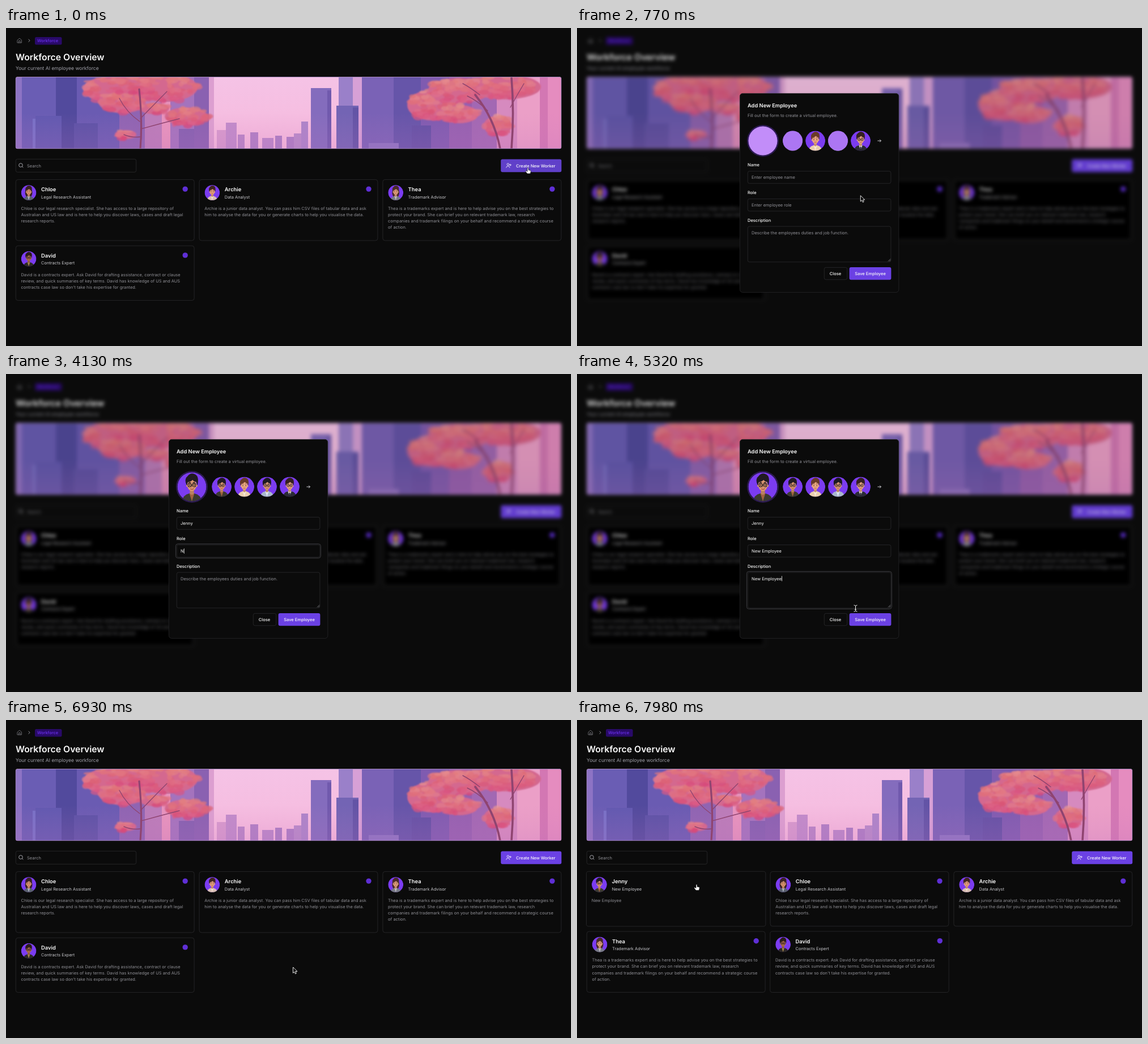
Write an HTML page that moves like this. It is 997 by 561 pixels and loops after 8 s.

```html
<!DOCTYPE html>
<html lang="en">
<head>
<meta charset="utf-8">
<title>Workforce Overview</title>
<style>
html, body { margin: 0; width: 100%; height: 100%; overflow: hidden; background: #0b0b0b; }
#veil, svg { position: absolute; left: 0; top: 0; width: 997px; height: 561px; }
#veil { background: #0b0b0b; overflow: hidden; }
#veil svg { filter: blur(3.4px) brightness(.9); }
text { font-family: Inter, "Open Sans", sans-serif; white-space: pre; text-rendering: geometricPrecision; }
</style>
</head>
<body>
<svg id="page"></svg>
<div id="veil"><svg id="soft"></svg></div>
<svg id="front"></svg>
<script>
const $ = id => document.getElementById(id);
const WHITE = '#fafafa', GREY = '#8f8f95', LINE = '#27272a', PURPLE = '#6b41e4', HOVER = '#6040c9';

// ---------- drawing helpers ----------
const text = (x, y, s, size = 7.5, fill = WHITE, weight = 400, extra = '') =>
  `<text x="${x}" y="${y}" font-size="${size}" fill="${fill}" font-weight="${weight}" ${extra}>${s}</text>`;
const rect = (x, y, w, h, fill, r = 0, extra = '') =>
  `<rect x="${x}" y="${y}" width="${w}" height="${h}" rx="${r}" fill="${fill}" ${extra}/>`;
const frame = (x, y, w, h, r, extra = '') => rect(x, y, w, h, 'none', r, `stroke="${LINE}" stroke-width=".9" ${extra}`);
const circle = (x, y, r, fill, extra = '') => `<circle cx="${x}" cy="${y}" r="${r}" fill="${fill}" ${extra}/>`;
const ellipse = (x, y, rx, ry, fill, extra = '') =>
  `<ellipse cx="${x}" cy="${y}" rx="${rx}" ry="${ry}" fill="${fill}" ${extra}/>`;
const path = (d, fill, extra = '') => `<path d="${d}" fill="${fill}" ${extra}/>`;
const line = (d, color, width, extra = '') =>
  path(d, 'none', `stroke="${color}" stroke-width="${width}" stroke-linecap="round" stroke-linejoin="round" ${extra}`);

// ---------- avatars ----------
const looks = {
  quiff:  { hair: '#211b22', coat: '#3b3a30', shirt: '#a0623f', skin: '#dc9872', glasses: 1 },
  wavy:   { hair: '#6a3b28', coat: '#e9cfae', shirt: '#f7e8d4', skin: '#eba982' },
  clerk:  { hair: '#1d1a22', coat: '#a9b7cd', shirt: '#dfe7f1', skin: '#dd9b76', glasses: 1 },
  bob:    { hair: '#35211f', coat: '#2a2a35', shirt: '#e4e4ea', skin: '#e9a883', glasses: 1, tie: 1 },
  long:   { hair: '#3a2224', coat: '#59606e', shirt: '#aeb2bf', skin: '#d8946f', long: 1 },
  curly:  { hair: '#40241f', coat: '#d8bfb4', shirt: '#f0dccd', skin: '#e6a17c' },
  auburn: { hair: '#4a2b28', coat: '#777a86', shirt: '#c2bcc2', skin: '#dd9e7c', long: 1 },
  suit:   { hair: '#2a1c18', coat: '#2c2926', shirt: '#a88a4e', skin: '#a96c48', glasses: 1 }
};
function avatar(name, x, y, r) {
  const k = looks[name];
  const glasses = [-7.5, 7.5].map(e => circle(e, -6, 6, 'none', 'stroke="#1c161b" stroke-width="2.2"')).join('');
  return `<g transform="translate(${x} ${y}) scale(${r / 50})" clip-path="url(#disc)">` +
    circle(0, 0, 50, '#7b3cf0') +
    (k.long ? ellipse(0, 0, 24, 33, k.hair) : '') +
    path('M-34 52Q-32 28 -9 23H9Q32 28 34 52Z', k.coat) +
    path('M-9 22L0 50L9 22Z', k.shirt) +
    (k.tie ? path('M-3 30H3L4 52H-4Z', '#23232e') : '') +
    path('M-7 8H7V23Q0 32 -7 23Z', k.skin, 'filter="brightness(.85)"') +
    circle(-16, -4, 4, k.skin) + circle(16, -4, 4, k.skin) +
    ellipse(0, -6, 16, 20.5, k.skin) +
    path('M-18 -4Q-28 -28 -15 -37Q-4 -50 9 -44Q27 -38 19 -4L15 -17Q6 -17 3 -24Q-6 -16 -14 -16Z', k.hair) +
    circle(-7.5, -6, 2.2, '#231815') + circle(7.5, -6, 2.2, '#231815') +
    line('M-11 -14Q-8 -16 -4 -14M4 -14Q8 -16 11 -14', k.hair, 2.2) +
    (k.glasses ? glasses + line('M-2 -6H2', '#1c161b', 2) : '') +
    line('M-1 -1Q1 3 -1 3', '#b8704f', 1.6) + line('M-5 7Q1 11 6 6', '#9a4438', 2) + '</g>';
}

// ---------- banner ----------
function banner() {
  let seed = 11;
  const rnd = () => (seed = seed * 16807 % 2147483647) / 2147483647;
  const towers = [
    [17, 87, 28, '#8d73c4'], [28, 87, 62, '#6a5db4'], [88, 87, 37, '#524a9d'], [47, 160, 38, '#7770c6'],
    [52, 155, 46, '#6259b0'], [125, 87, 75, '#6a5bb2'], [120, 168, 42, '#5c52a6'], [200, 87, 45, '#8f64b2'],
    [245, 87, 45, '#bb7cb9'], [275, 130, 30, '#e793bd'], [290, 87, 42, '#a473bd'], [332, 87, 26, '#8a61b1'],
    [358, 87, 9, '#dc9fd0'], [305, 178, 27, '#8560b0'],
    [372, 180, 16, '#d79acd'], [388, 167, 19, '#c18bca'], [409, 188, 12, '#b985c6'], [431, 184, 14, '#b07fc4'],
    [452, 194, 20, '#bb87c8'], [475, 190, 12, '#ac7dc3'], [495, 192, 14, '#ad7dc4'], [508, 186, 13, '#b88ac9'],
    [521, 165, 12, '#ad84c9'], [587, 87, 26, '#9a80c9'], [612, 87, 16, '#d7a0d6'], [538, 106, 36, '#846cbd'],
    [567, 110, 7, '#7059ad'], [583, 137, 39, '#7364b4'], [612, 140, 10, '#6354a6'],
    [628, 87, 62, '#7a62b6'], [684, 87, 48, '#6655a9'], [732, 87, 50, '#7f5bb0'], [782, 87, 40, '#9560b0'],
    [822, 87, 44, '#a268b3'], [866, 87, 36, '#d68abf'], [902, 87, 40, '#eb9fc7'], [942, 87, 14, '#d377b3'],
    [956, 87, 24, '#e58cbf'], [640, 203, 53, '#8d74c2'], [716, 172, 34, '#6451a5']
  ];
  // a soft body with dabs of colour, lit from above
  const leaves = (x, y, w, h) => {
    let out = ellipse(x, y, w, h, '#d4688f');
    for (let n = w * h / 18; n > 0; n--) {
      const a = rnd() * 6.28, d = Math.sqrt(rnd()), v = Math.sin(a) * d;
      const light = 62 - 7 * v + rnd() * 6;
      out += ellipse((x + Math.cos(a) * w * d).toFixed(1), (y + v * h).toFixed(1), (4 + rnd() * 7).toFixed(1),
        (2 + rnd() * 4).toFixed(1), `hsl(${(350 - 12 * v).toFixed(0)} 64% ${light.toFixed(0)}%)`, 'opacity=".7"');
    }
    return out;
  };
  const crown = list => `<g filter="url(#mist)">${list.map(c => leaves(...c)).join('')}</g>`;
  const bark = '#8f4470';
  return `<g clip-path="url(#strip)">` + rect(17, 86, 963, 127, 'url(#sky)') +
    towers.map(([x, y, w, c]) => rect(x, y, w, 213 - y, c)).join('') +
    rect(17, 150, 963, 63, 'url(#haze)') +
    crown([[180, 108, 44, 22], [205, 130, 42, 20], [280, 105, 58, 25], [225, 98, 60, 18], [318, 156, 38, 16], [262, 142, 26, 10], [211, 188, 19, 8]]) +
    line('M236 165Q212 148 200 124M237 160Q262 134 284 112M237 192Q222 194 208 188M238 178Q275 168 306 160', bark, 1.4) +
    line('M237 213Q241 165 235 108', bark, 3.2) +
    crown([[752, 136, 44, 27], [800, 110, 55, 22], [880, 104, 64, 22], [800, 152, 34, 16], [868, 172, 25, 17]]) +
    line('M836 118Q818 104 806 98M850 146Q832 128 814 120M890 140Q902 118 914 98', bark, 1.4) +
    line('M892 213Q897 150 892 88M872 213Q862 160 828 118', bark, 3.6) +
    '</g>' + frame(17.3, 86.5, 962.4, 126.2, 3, 'style="stroke:#a184bd"');
}

// ---------- worker cards ----------
const workers = {
  Jenny: ['New Employee', 'quiff', ['New Employee']],
  Chloe: ['Legal Research Assistant', 'long', ['Chloe is our legal research specialist. She has access to a large repository of',
    'Australian and US law and is here to help you discover laws, cases and draft legal', 'research reports.']],
  Archie: ['Data Analyst', 'curly', ['Archie is a junior data analyst. You can pass him CSV files of tabular data and ask',
    'him to analyse the data for you or generate charts to help you visualise the data.']],
  Thea: ['Trademark Advisor', 'auburn', ['Thea is a trademarks expert and is here to help advise you on the best strategies to',
    'protect your brand. She can brief you on relevant trademark law, research',
    'companies and trademark filings on your behalf and recommend a strategic course', 'of action.']],
  David: ['Contracts Expert', 'suit', ['David is a contracts expert. Ask David for drafting assistance, contract or clause',
    "review, and quick summaries of key terms. David has knowledge of US and AUS", "contracts case law so don't take his expertise for granted."]]
};
function card(name, i, rowY, rowH, dark) {
  const [role, look, lines] = workers[name];
  const x = 17.3 + i % 3 * 323.8, y = rowY[i / 3 | 0], h = rowH[i / 3 | 0];
  return `<g data-worker="${name}" data-mid="${x + 157.4} ${y + h / 2}">` +
    frame(x, y, 314.8, h, 4) + (dark ? rect(x + 4, y + 4, 306, h - 8, '#000') : '') +
    avatar(look, x + 22.8, y + 23, 13.4) +
    text(x + 44.7, y + 20.9, name, 9.4, WHITE, 600) + text(x + 44.7, y + 33.2, role, 7.45, '#c6c6ca') +
    (name === 'Jenny' ? '' : circle(x + 298.9, y + 16.7, 4.7, '#5f2fd6')) +
    lines.map((s, n) => text(x + 9.2, y + 53.3 + n * 11.15, s, 7.43, GREY)).join('') + '</g>';
}
const cards = (names, rowY, rowH, dark) => names.map((n, i) => card(n, i, rowY, rowH, dark)).join('');

function scene(dark) {
  const before = cards(['Chloe', 'Archie', 'Thea', 'David'], [267.4, 384.2], [107.6, 96.4], dark);
  const after = dark ? '' : cards(['Jenny', 'Chloe', 'Archie', 'Thea', 'David'], [267.4, 373], [96.4, 107.4]);
  return `<defs><clipPath id="disc"><circle r="50"/></clipPath>
    <clipPath id="strip"><rect x="17" y="86.2" width="963" height="126.8" rx="3.5"/></clipPath>
    <filter id="mist"><feGaussianBlur stdDeviation="1.3"/></filter>
    <linearGradient id="sky" x2="0" y2="1"><stop stop-color="#f5c3e6"/><stop offset="1" stop-color="#f6b9dc"/></linearGradient>
    <linearGradient id="haze" x2="0" y2="1"><stop stop-color="#d07fc0" stop-opacity="0"/><stop offset="1" stop-color="#c070c0" stop-opacity=".2"/></linearGradient></defs>` +
    line('M20.3 21.2L23.9 18.2L27.5 21.2V26H20.3ZM22.6 26V22.6H25.2V26', '#8d8d94', .7) +
    line('M39.9 20L42 22.2L39.9 24.4', '#a1a1aa', .9) +
    rect(51, 16, 47.5, 13.6, '#290a69', 2.5) + text(55, 25.1, 'Workforce', 7.4, '#6a30ee', 500) +
    text(17, 57.3, 'Workforce Overview', 15.75, WHITE, 600) +
    text(17, 74.1, 'Your current AI employee workforce', 8.6, '#a1a1aa') +
    banner() +
    frame(17.3, 231.3, 212.4, 23, 3) + line('M28.6 244.4L30 246', '#b4b4ba', .9) +
    circle(26, 242, 3.3, 'none', 'stroke="#b4b4ba" stroke-width=".9"') +
    text(37, 245.5, 'Search', 7.5, '#8d8d93') +
    rect(873.2, 231.4, 107, 22.8, PURPLE, 3, 'class="create"') +
    circle(885.8, 240.6, 1.8, 'none', 'stroke="#fff" stroke-width=".8"') +
    line('M882.6 246.2Q882.8 243.7 885.8 243.7Q888.6 243.7 888.9 246.2M889.9 240V243.2M888.3 241.6H891.5', '#fff', .8) +
    text(900, 245.5, 'Create New Worker', 7.45, WHITE, 500) +
    `<g class="before">${before}</g><g class="after">${after}</g>`;
}

// ---------- dialog ----------
const fields = [
  { id: 'name', label: 'Name', y: 252.6, h: 21.6, hint: 'Enter employee name' },
  { id: 'role', label: 'Role', y: 301.4, h: 21.6, hint: 'Enter employee role' },
  { id: 'desc', label: 'Description', y: 350, h: 62.8, hint: 'Describe the employees duties and job function.' }
];
const faces = [['quiff', 328, 25.5], ['quiff', 380.6, 17.5], ['wavy', 420.6, 17.5], ['clerk', 460.5, 17.5], ['bob', 500.5, 17.5]];
const dialog = () =>
  rect(287.4, 115.4, 280.4, 351, '#0b0b0b', 5, `stroke="${LINE}" stroke-width=".8"`) +
  text(301, 140.2, 'Add New Employee', 9.3, WHITE, 600) +
  text(301, 156.5, 'Fill out the form to create a virtual employee.', 7.55, GREY) +
  circle(328, 199, 28, '#2c1a52') +
  faces.map(([look, x, r], i) => avatar(look, x, 199, r) +
    (i === 2 || i === 4 ? '' : circle(x, 199, r, i ? '#ac76f3' : '#c28df9', 'class="blank"'))).join('') +
  line('M530.8 199H536.4M534.4 197L536.4 199L534.4 201', '#dedee2', .9) +
  fields.map(f => text(301, f.y - 8.4, f.label, 7.5, WHITE, 500) +
    frame(299.4, f.y - 1.7, 256, f.h + 3.4, 4, `id="${f.id}Ring" style="stroke:#424247"`) +
    frame(301.3, f.y, 252.6, f.h, 3) + text(308, f.y + 13.5, '', 7.5, WHITE, 400, `id="${f.id}"`)).join('') +
  line('M549.3 411.3L553 407.6M551.6 411.3L553 409.9', '#a0a0a5', .7) +
  rect(308, 0, .8, 9, WHITE, 0, 'id="caret"') +
  frame(436.3, 422.4, 40.4, 21.4, 3) + text(456, 435.8, 'Close', 7.5, WHITE, 500, 'text-anchor="middle"') +
  rect(480.6, 422, 73.8, 22.2, PURPLE, 3, 'id="save"') +
  text(517.5, 435.8, 'Save Employee', 7.5, WHITE, 500, 'text-anchor="middle"');

const beam = 'M-2.6 -5.6Q0 -5.6 0 -4V4Q0 5.6 -2.6 5.6M2.6 -5.6Q0 -5.6 0 -4M2.6 5.6Q0 5.6 0 4M-1.4 1.6H1.4';
const pointers = {
  arrow: path('M0 0V10.4L2.4 8.2L4 11.8L5.8 11L4.2 7.5H7.4Z', '#000', 'stroke="#fff" stroke-width=".9" stroke-linejoin="round"'),
  hand: path('M-1 1A1 1 0 0 1 1 1V4.1L4.4 4.8Q5.4 5.1 5.2 6.2L4.6 9.2Q4.3 10.4 3.2 10.4H-.6Q-1.4 10.4 -2 9.6L-4.1 6.5Q-4.4 5.4 -3.5 5.2T-2 5.9L-1 6.8Z',
    '#fff', 'stroke="#000" stroke-width=".6"'),
  text: line(beam, '#000', 2) + line(beam, '#fff', 1)
};

$('page').innerHTML = scene(false);
$('soft').innerHTML = scene(true);
$('front').innerHTML = `<g id="dialog">${dialog()}</g><g id="pointer"></g>`;
show(document.querySelector('#soft .after'), false);

// ---------- timeline ----------
function show(el, on) { el.style.display = on ? '' : 'none'; }
const ramp = (t, a, b) => Math.min(1, Math.max(0, (t - a) / (b - a)));
const smooth = p => p * p * (3 - 2 * p);

// time, x, y, shape from that time on
const moves = [
  [0, 921, 246.5, 'hand'], [280, 921, 246.5, 'arrow'], [770, 500.3, 295.6, 'arrow'], [840, 497, 281, 'arrow'],
  [1120, 404.5, 267.5, 'text'], [4900, 404.5, 267.5, 'text'], [5250, 491.5, 413.5, 'text'], [5390, 491.5, 413.5, 'text'],
  [5600, 506.5, 436.8, 'hand'], [6020, 506.5, 436, 'arrow'], [7000, 506.5, 436, 'hand'], [7250, 506.5, 436, 'hand'],
  [7980, 211, 290, 'hand']
];
function pointerAt(t) {
  let i = moves.length - 1;
  while (moves[i][0] > t) i--;
  const a = moves[i], b = moves[i + 1] || a;
  const p = a === b ? 0 : smooth(ramp(t, a[0], b[0]));
  return [a[1] + (b[1] - a[1]) * p, a[2] + (b[2] - a[2]) * p, a[3]];
}

const nameKeys = [2660, 2870, 2940, 3080, 3150];
const title = 'New Employee';
function typed(t) {
  const role = t < 4480 ? (t < 4130 ? 0 : Math.min(4, 1 + Math.floor((t - 4130) / 70)))
    : 4 + 2 * (1 + Math.floor((t - 4480) / 70));
  const desc = t < 4900 ? 0 : 3 * (1 + Math.floor((t - 4900) / 70));
  return ['Jenny'.slice(0, nameKeys.filter(k => t >= k).length), title.slice(0, role), title.slice(0, desc)];
}

function hover(name, k) {
  const g = document.querySelector(`#page .after [data-worker=${name}]`);
  const [x, y] = g.dataset.mid.split(' ');
  g.setAttribute('transform', `translate(${x} ${y}) scale(${1 + .005 * k}) translate(${-x} ${-y})`);
}

function draw(t) {
  const open = t < 3000 ? 1 - (1 - ramp(t, 35, 280)) ** 2 : 1 - ramp(t, 5745, 5953);
  show($('veil'), open > 0);
  show($('dialog'), open > 0);
  $('veil').style.opacity = $('dialog').style.opacity = open;
  const s = .95 + .05 * open;
  $('dialog').setAttribute('transform', `translate(427.5 ${291 + 8 * (1 - open)}) scale(${s}) translate(-427.5 -291)`);
  document.querySelector('#page .create').setAttribute('fill', t < 280 ? HOVER : PURPLE);
  $('save').setAttribute('fill', t >= 5530 ? HOVER : PURPLE);
  document.querySelectorAll('.blank').forEach((el, i) => show(el, t < 910 + 70 * i));

  const focus = t < 1540 || t >= 5670 ? -1 : t < 3500 ? 0 : t < 4830 ? 1 : 2;
  const values = typed(t);
  fields.forEach((f, i) => {
    const el = $(f.id);
    el.textContent = values[i] || f.hint;
    el.setAttribute('fill', values[i] ? WHITE : GREY);
    show($(f.id + 'Ring'), focus === i);
  });
  const blink = (t >= 2100 && t < 2590) || (t >= 3990 && t < 4130);
  show($('caret'), focus >= 0 && !blink);
  if (focus >= 0) {
    const f = fields[focus];
    $('caret').setAttribute('x', 308.2 + (values[focus] ? $(f.id).getComputedTextLength() : 0));
    $('caret').setAttribute('y', f.y + 6.4);
  }

  const added = t >= 7000;
  show(document.querySelector('#page .before'), !added);
  show(document.querySelector('#page .after'), added);
  hover('David', ramp(t, 7000, 7150) - ramp(t, 7840, 8080));
  hover('Jenny', ramp(t, 7770, 7910));

  const [x, y, shape] = pointerAt(t);
  const pointer = $('pointer');
  show(pointer, t < 2660 || t >= 4900);
  if (pointer.dataset.shape !== shape) {
    pointer.dataset.shape = shape;
    pointer.innerHTML = pointers[shape];
  }
  pointer.setAttribute('transform', `translate(${x} ${y})`);
}

// the picture advances in steps of 70 ms
const start = performance.now();
let last = -1;
function tick() {
  const t = Math.floor((performance.now() - start) % 8000 / 70) * 70;
  if (t !== last) draw(last = t);
  requestAnimationFrame(tick);
}
tick();
</script>
</body>
</html>
```
